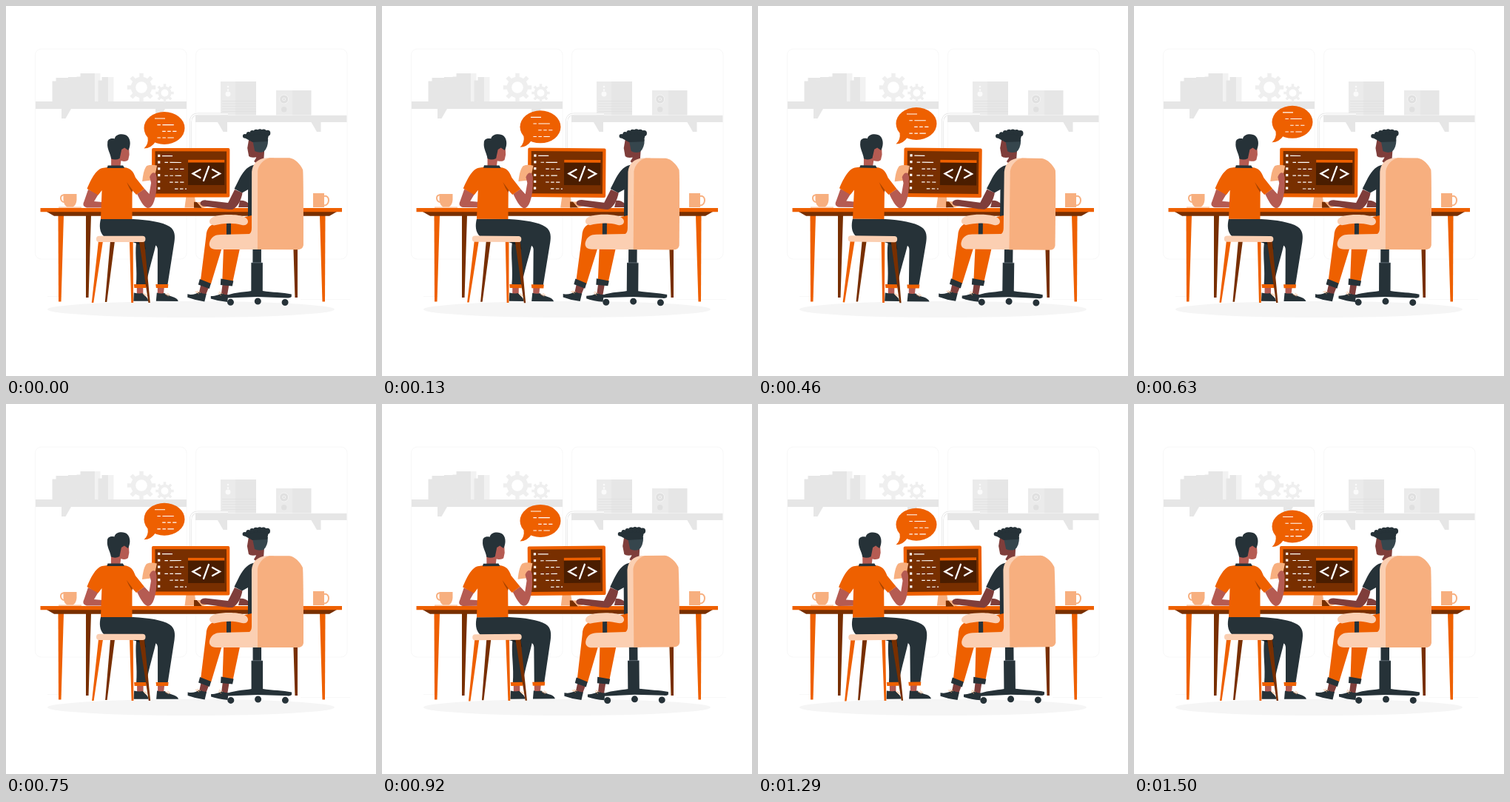
Recreate the animation shown at these times as an HTML page. Size 500 px wide and 500 px high, loop 1540 ms.

```html
<!DOCTYPE html>
<html lang="en">
<head>
<meta charset="utf-8">
<title>Pair at work</title>
<style>
  html, body { margin: 0; width: 100%; height: 100%; overflow: hidden; background: #fff; }
  svg { display: block; width: 100vw; height: 100vh; }
  .orange { fill: #ee6000; }
  .brown { fill: #782f00; }
  .peach { fill: #f7af7f; }
  .light { fill: #fbcfb2; }
  .dark { fill: #263238; }
  .skin { fill: #b55b52; }
  .deep { fill: #7f3e3b; }
  .line { fill: none; stroke: #fff; }
  .lace { fill: none; stroke: #f7af7f; stroke-width: .8; }
</style>
</head>
<body>
<svg viewBox="0 0 500 500">
  <defs>
    <path id="bracket" d="M0 0H13V13H7.500Z" fill="#e6e6e6"/>
    <path id="wire" d="M249.500 193V157Q249.500 146 260 146H300" fill="none"/>
    <g id="legs">
      <path class="brown" d="M108 283H115L111.500 394H108Z"/>
      <path class="orange" d="M70.500 283H78L74.500 399.500H71Z"/>
    </g>
  </defs>

  <g id="room">
    <g fill="none" stroke="#f8f8f8">
      <rect x="39.5" y="58" width="204.5" height="284" rx="8"/>
      <rect x="256.5" y="58" width="204.5" height="284" rx="8"/>
      <path d="M56 392.500H76M398 396.500H465"/>
    </g>
    <path d="M40 129H244V139H40ZM256 147.700H460.500V157H256Z" fill="#e6e6e6"/>
    <use href="#bracket" transform="translate(88 139) scale(-1 1)"/>
    <use href="#bracket" transform="translate(215 139) scale(-1 1)"/>
    <use href="#bracket" x="286" y="157"/>
    <use href="#bracket" x="412.500" y="157"/>
    <g id="books"></g>
    <g id="gears" fill="none" stroke="#efefef"></g>
    <path d="M290 102H310V147.500H290ZM365 114H387V147.500H365Z" fill="#ebebeb"/>
    <path d="M310 102H338V147.500H310ZM387 114H412.500V147.500H387Z" fill="#e6e6e6"/>
    <path id="vents" stroke="#e0e0e0" stroke-width=".8"/>
    <g id="knobs" fill="#fafafa"></g>
    <use href="#wire" stroke="#e3e3e3" stroke-width="3"/>
    <use href="#wire" stroke="#fff" stroke-width="1.600"/>
    <ellipse cx="250" cy="410" rx="194" ry="11" fill="#f5f5f5"/>
  </g>

  <g id="table">
    <use href="#legs"/>
    <use href="#legs" transform="translate(502) scale(-1 1)"/>
    <path class="brown" d="M55 278H447L437 283.800H65Z"/>
    <path class="orange" d="M46.500 273H454V278.300H46.500Z"/>
    <path class="light" d="M71 271.300H102V273H71Z"/>
    <path class="peach" d="M77.500 254H95.500V262Q95 269 90.500 271.500H82.500Q78 269 77.500 262ZM415 253H430V272H415Z"/>
    <path d="M78 255.500C72.500 254.500 72.500 265 79 265M430 257C438 255 438 269.500 430 269.500" fill="none" stroke="#f7af7f" stroke-width="2"/>
  </g>

  <g id="bubble">
    <ellipse class="orange" cx="214" cy="165.500" rx="27.500" ry="22"/>
    <path class="orange" d="M191.500 178Q193 187 186.500 193Q196 193 202 184Z"/>
    <path class="line" id="talk" stroke-width="1.100"/>
  </g>

  <g id="screen">
    <path class="peach" d="M243.500 257H255L257 272.500H241.500Z"/>
    <rect class="orange" x="197" y="192" width="105.300" height="66.500" rx="2"/>
    <path class="brown" d="M201.500 196.300H298V253.500H201.500Z"/>
    <path d="M246 207.500H295.300V242H246Z" fill="#4a1d00"/>
    <path class="orange" d="M246 207.700H295.300V211.500H246Z"/>
    <path d="M206.700 200.800V250" stroke="#fff" stroke-width="3.200" stroke-dasharray="3.200 5.600"/>
    <path class="line" id="code" stroke-width="1.200"/>
    <path class="line" d="M262.500 221L252.500 226.500L262.500 232M274 217L267 236M279 221L289 226.500L279 232" stroke-width="2.300" stroke-linecap="round"/>
  </g>

  <g id="left">
    <path class="dark" d="M172 316H204C200 336 193 356 189.500 377H176C178 356 174 338 176 320Z"/>
    <path class="skin" d="M177 380H185.500V389H177ZM205 380H214L213 390H205Z"/>
    <path class="dark" d="M173 387.500Q180 389 185 388C187 392 192 393 192.500 398.800H172.500ZM204 387.500Q209 389 214.500 388C219 393 231 392 233 398.800H203Z"/>
    <path class="lace" d="M185 388L190 393M187 388.500L191 391.500M215 389L220 392M218 388L222 391"/>
    <path class="dark" d="M128 288H172C192 289 212 292 221 298C229 303 228.500 312 227.500 319L218.500 377H205V329C205 323 200 322 195 321L133 312C126 306 126 296 128 288Z"/>
    <path class="orange" d="M173 376H189.500V381H173.500ZM202.500 376H219.500L219 381H203Z"/>
    <path d="M171 319H187L189 329Q181 321 171 319Z" fill="#151d21"/>
    <path class="brown" d="M141 318H147L136.500 400H134ZM180 318H187L195 401H192.700Z"/>
    <path class="orange" d="M125 318H131L118.500 401H116ZM167 318H171.700L172.300 401H169.500Z"/>
    <rect class="light" x="122" y="310.800" width="66.500" height="8.200" rx="4"/>
    <path class="peach" d="M190 216Q196 213.500 204 215.500L200 235L184 237C185 229 186 221 190 216Z"/>
    <path class="skin" d="M111 248L125 254L119 264L130 265L129.500 272.500H109C104 271 103.500 268 105.500 264ZM177 254L187 247L193.500 254L196 239L194 231Q197 223 202 226Q204 230 203.500 237Q204 252 200 264Q197 273 191.500 273C186 272 181 262 177 254Z"/>
    <path class="skin" d="M142 204H156L154 219H142Z"/>
    <path class="orange" d="M137 218H159C169 219 172 224 175 232L187 247L176 255L170.500 249V288H128L129.500 249L124.500 255.500L109.500 247C114 236 121 221 130 219Z"/>
    <path d="M163 238L171 249L170.500 252Q166 246 163 238Z" fill="#a84400"/>
    <path class="dark" d="M137.500 215.500H158L160 219H136.500Z"/>
    <path class="skin" d="M154 191H166L166.500 201L165 208C162 211 156 210 153 208Z"/>
    <path class="dark" d="M137 185C137 179 143 178.500 146.500 179.500C148 172 160 172 164 176C169 181 168 190 165 195L160 191.500L156 194L153.500 206Q148 209 142 206.500C141 199 136 193 137 185Z"/>
  </g>

  <g id="right">
    <path class="brown" d="M254 265H258L265 273H254Z"/>
    <path class="peach" d="M258 265H265L272 271L265 273Z"/>
    <path class="deep" d="M316 263Q322 262 328 267V272H314Z"/>
    <path class="deep" d="M337 195H349L348 210L340 214L335 210L338 205Z"/>
    <path class="dark" d="M334 215C325 217 319 226 314 236L308.500 247L319 252.500L327 248V286H350V212Z"/>
    <path class="deep" d="M309 248L319.500 252.500C318 262 313 272 306 275C298 275.500 283 272 266 270.500C260 268.500 262 262 270 262.500L300 266Z"/>
    <path class="deep" d="M328 180L326 192L328 203Q331 206 340 204L348 196V180Z"/>
    <path d="M333 181L354 180Q354 192 348 197Q341 199 336 196Z" fill="#36464d"/>
    <path class="dark" d="M324 173Q338 166 355 173L353 183L333 184L322 178Z"/>
    <g class="dark" id="curls"></g>
    <path class="deep" d="M264 374L275 378L270 391L261 388ZM293 374H302L299 392L291 390Z"/>
    <path class="dark" d="M245.500 389.500C252 391 257 389 261.500 386.500Q266 389 271 389L268.500 399.500Q256 398 245.500 394ZM277 392C284 392 288 390 292 388Q296 391 300.500 390L299.500 400Q287 399 277 395.500Z"/>
    <path class="lace" d="M256 386L261 389M258 385.500L263 387.500M287 388L291 391M288 386.500L293 389"/>
    <path class="orange" d="M332 283L290 292C276 294 271 300 270.500 311L263 371.500L277 376L291.500 328H294L292.500 370.500L306.500 373L316 328L334 312Z"/>
    <path class="dark" d="M262 369L277 375L275 382L260 376.500ZM290.500 368.500L307.500 371.500L306 378.500L290 377Z"/>
    <path class="dark" d="M298 292H304V311H298Z"/>
    <path class="light" d="M275 290C277 284 288 282 302 282C316 282 328 285 327 292Q326 297 319 296C305 292 292 294 281 296.500Q274 295 275 290Z"/>
    <path class="dark" d="M333.500 328H345V347H333.500ZM331.500 347H347V387H331.500Z"/>
    <path d="M331.500 346.800H347M339.800 386V393" stroke="#84909a" stroke-width=".6"/>
    <path class="dark" d="M294 393C306 387 320 387 332 385H347C360 387 374 387 386 389.500V393Q384 395 380 394.300L340 393L300 394.500Z"/>
    <g class="dark" id="casters"></g>
    <path class="light" d="M332 224C333 213 340 206 352 205.200H362L350 329H284C277 329 274 325 275 320C277 312 283 309 290 309L329 308Q332 306 332 300Z"/>
    <path class="peach" d="M340 223C341 215 348 207 356 205.200H383C390 206 398 214 401 221Q402 225 402 323Q401 329 394 329H340Z"/>
  </g>
</svg>
<script>
const $ = id => document.getElementById(id);
const times = (n, make) => Array.from({ length: n }, (_, i) => make(i)).join('');
const circle = (x, y, r, extra = '') => `<circle cx="${x}" cy="${y}" r="${r}" ${extra}/>`;

// Indented rows of short dashes, each closed by a longer one.
const rows = (n, x0, y0, gap) => times(n, i => {
  const depth = i % 2 ? (i < 5 ? 1 + (i === 4) : 5) : i && 3;
  const x = x0 + 3.4 * depth, y = y0 + gap * i;
  const shorts = Math.min(i, 2);
  const end = x + (depth ? 24 - 1.6 * depth : 14);
  return times(shorts, k => `M${x + 7 * k} ${y}h4.5`) + `M${x + 7 * shorts} ${y}H${end}`;
});
$('talk').setAttribute('d', rows(4, 201, 152.5, 8.7));
$('code').setAttribute('d', rows(6, 211, 202.6, 8.9));

const gear = (x, y, r) => {
  const teeth = times(8, i => {
    const a = i * Math.PI / 4, c = Math.cos(a), s = Math.sin(a);
    return `M${x + c * r} ${y + s * r}L${x + c * r * 1.75} ${y + s * r * 1.75}`;
  });
  return circle(x, y, r, `stroke-width="${r * .58}"`) +
    `<path d="${teeth}" stroke-width="${r * .5}"/>`;
};
$('gears').innerHTML = gear(183, 110, 11) + gear(214.5, 117.5, 7);

// Pairs of a cover and a paler page edge, leaning on one another.
$('books').innerHTML = times(4, i => {
  const x = 67.5 + 16.5 * i + (i === 3 ? 12.5 : 0);
  const top = i === 2 ? 91 : 97 - i % 2;
  const w = i === 3 ? 9 : 20;
  const slab = (x, y, w, c) => `<path d="M${x} ${y}h${w}V129h${-w}Z" fill="${c}"/>`;
  return slab(x - 5, top + 4.5, 6, '#e6e6e6') + slab(x, top, w, '#e6e6e6') +
    slab(x + w, top, 7, '#f2f2f2');
});

$('vents').setAttribute('d', times(5, i => `M292 ${128.5 + 3.5 * i}H338`));
$('knobs').innerHTML = circle(300, 119, 3.4) + circle(300, 109, 1.3) + circle(300, 113.5, 1.3) +
  [6, 2].map(r => circle(375.7, 126, r, 'fill="#e0e0e0" stroke="#f5f5f5"')).join('') +
  circle(375.7, 139.7, 3.7, 'fill="#e0e0e0"');
$('curls').innerHTML = times(7, i => {
  const x = 322.5 + 5.1 * i;
  return circle(x, 169.8 + 6 * ((x - 342) / 19.5) ** 2, 2.8 + .2 * i);
});
$('casters').innerHTML = times(3, i => circle(303.7 + 36.8 * i, 400.4 - 1.4 * (i % 2), 4.5));

const LOOP = 1540, FRAMES = 37, FPS = 24;
const pivots = { left: '168.5 287', right: '323.5 285.5', screen: '249.6 232' };

// Both waves are linear: sway runs 0, 1, 0, -1, 0 and rise 0, -10, 0.
const sway = p => p < .25 ? 4 * p : p < .75 ? 2 - 4 * p : 4 * p - 4;
const rise = p => -10 * (1 - Math.abs(1 - 2 * p));

function draw(now) {
  const step = Math.min(FRAMES - 1, Math.floor((now % LOOP + 4.9) * FPS / 1000));
  const p = (step + 1) / FRAMES % 1;
  for (const id in pivots) $(id).setAttribute('transform', `rotate(${sway(p)} ${pivots[id]})`);
  $('bubble').setAttribute('transform', `translate(0 ${rise(p)})`);
}

const start = performance.now();
const tick = () => {
  draw(performance.now() - start);
  requestAnimationFrame(tick);
};
tick();
</script>
</body>
</html>
```
